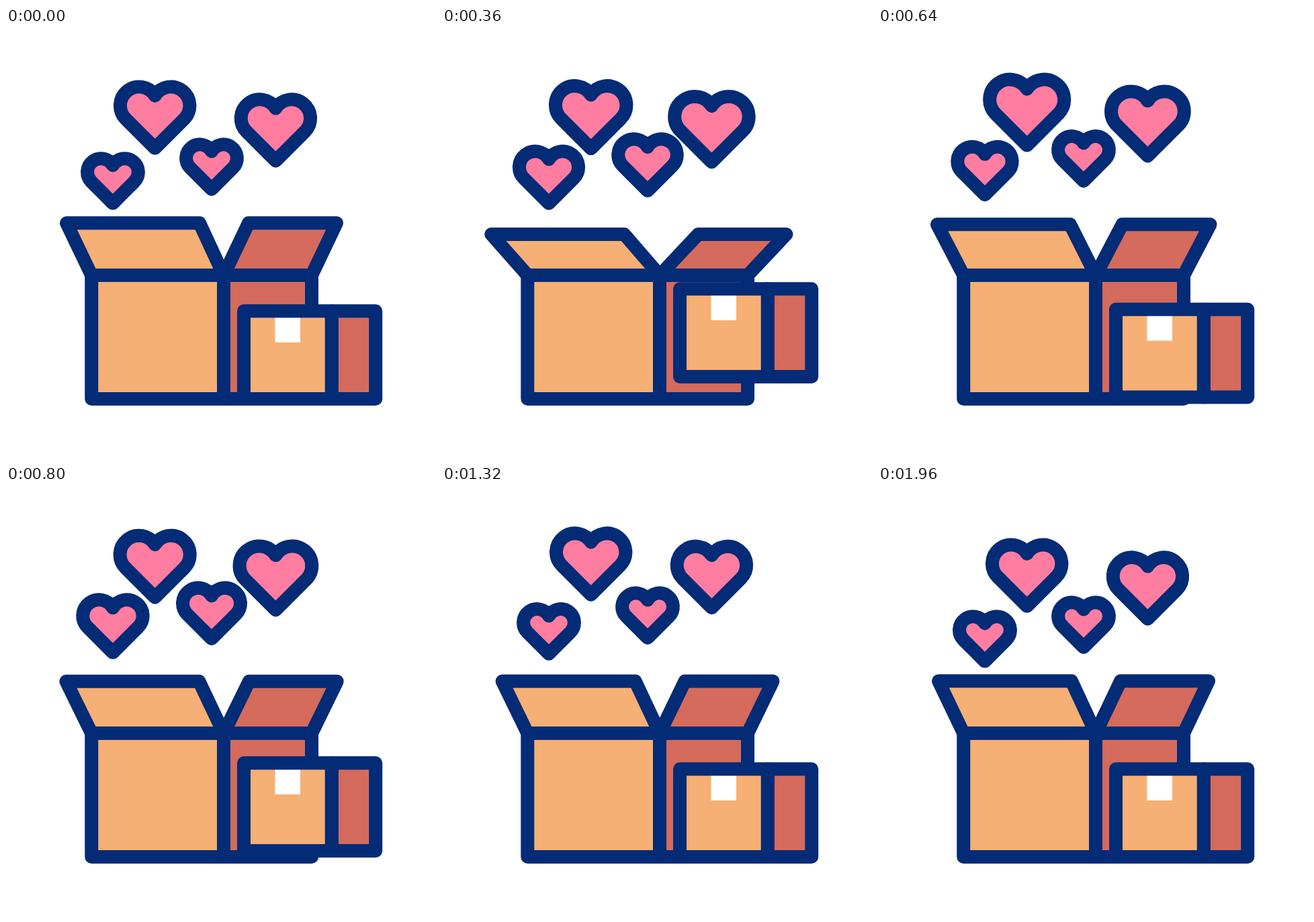
Animation of 640x640 px, one loop 2.12 s. Source, as an HTML page:

```html
<!DOCTYPE html>
<html lang="en">
<head>
<meta charset="utf-8">
<title>Boxes and hearts</title>
<style>
  html, body { margin: 0; width: 100%; height: 100%; overflow: hidden; background: #fff; }
  svg { display: block; width: 100%; height: 100%; }
  .line { stroke: #042b76; stroke-width: 20; stroke-linejoin: round; }
  .front { fill: #f6af74; }
  .side { fill: #d46b5c; }
  .heart { fill: #ff7da0; }
</style>
</head>
<body>
<svg viewBox="0 0 640 640">
  <g class="line">
    <path class="side" d="M324 368H455V552H324Z"/>
    <path class="front" d="M127.3 368H324V552H127.3Z"/>
    <path class="side" id="rightFlap"/>
    <path class="front" id="leftFlap"/>
  </g>
  <g id="parcel">
    <path class="line side" d="M484.7 421.3H550.2V552H484.7Z"/>
    <path class="front" d="M354 421.3H484.7V552H354Z"/>
    <path fill="#fff" d="M400.5 421.3H438V468H400.5Z"/>
    <path class="line" fill="none" d="M354 421.3H484.7V552H354Z"/>
  </g>
  <g id="hearts" class="line heart"></g>
</svg>
<script>
  const LOOP = 2120, STEP = 40;
  const $ = id => document.getElementById(id);

  const ease = u => (1 - Math.cos(Math.PI * Math.min(1, Math.max(0, u)))) / 2;

  // 0 until start, 1 at peak, 0 again from end on
  const hump = (t, start, peak, end) =>
    t < peak ? ease((t - start) / (peak - start)) : ease((end - t) / (end - peak));

  const BEAT = 465;
  const beats = (t, start) => [0, BEAT].reduce(
    (sum, lag) => sum + hump(t, start + lag, start + lag + BEAT / 2, start + lag + BEAT), 0);

  // x, y: middle of the shape; r: lobe radius; gap: lobe distance from the axis;
  // beat, grow: pulse start and added width; rise, peak, fall: drift times
  const big = { r: 28, gap: 23.7 }, small = { r: 20.3, gap: 17.6 };
  const hearts = [
    { ...big, x: 221.7, y: 133.2, beat: 300, grow: 13.5, rise: 280, peak: 1130, fall: 1900 },
    { ...big, x: 401.4, y: 152, beat: 260, grow: 18, rise: 220, peak: 1090, fall: 1920 },
    { ...small, x: 159, y: 227.5, beat: 75, grow: 14, rise: 60, peak: 930, fall: 1770 },
    { ...small, x: 306, y: 206.7, beat: 175, grow: 13, rise: 140, peak: 1010, fall: 1850 }
  ];

  for (const h of hearts) {
    h.node = document.createElementNS('http://www.w3.org/2000/svg', 'path');
    $('hearts').append(h.node);
  }

  function heartPath(x, y, r, gap) {
    const d = r * Math.SQRT1_2;
    const lobeY = y - (gap + 2 * d - r) / 2;
    const notch = lobeY - Math.sqrt(r * r - gap * gap);
    const arc = `A${r} ${r} 0 1 1 `;
    return `M${x - gap - d} ${lobeY + d}${arc}${x} ${notch}` +
           `${arc}${x + gap + d} ${lobeY + d}L${x} ${lobeY + gap + 2 * d}Z`;
  }

  function draw(t) {
    const open = 16.8 * hump(t, 40, 370, 720) + 5 * hump(t, 720, 1080, 1370);
    const top = 290.2 + open, right = 1.22 * open;
    $('leftFlap').setAttribute('d',
      `M127.3 368H324L${288 - open} ${top}H${90 - open}Z`);
    $('rightFlap').setAttribute('d',
      `M324 368H455L${492 + right} ${top}H${361 + right}Z`);

    const jump = 40 * hump(t, 40, 280, 570) + 9.5 * hump(t, 570, 770, 980) +
                 4 * hump(t, 1000, 1150, 1300);
    $('parcel').setAttribute('transform', `translate(0 ${-jump})`);

    for (const h of hearts) {
      const scale = 1 + h.grow * beats(t, h.beat) / (2 * (h.r + h.gap));
      const y = h.y - 20 * hump(t, h.rise, h.peak, h.fall);
      h.node.setAttribute('d', heartPath(h.x, y, h.r * scale, h.gap * scale));
    }
  }

  const begin = performance.now();
  function tick() {
    const t = (performance.now() - begin) % LOOP;
    draw(Math.floor(t / STEP) * STEP);
    requestAnimationFrame(tick);
  }
  tick();
</script>
</body>
</html>
```
